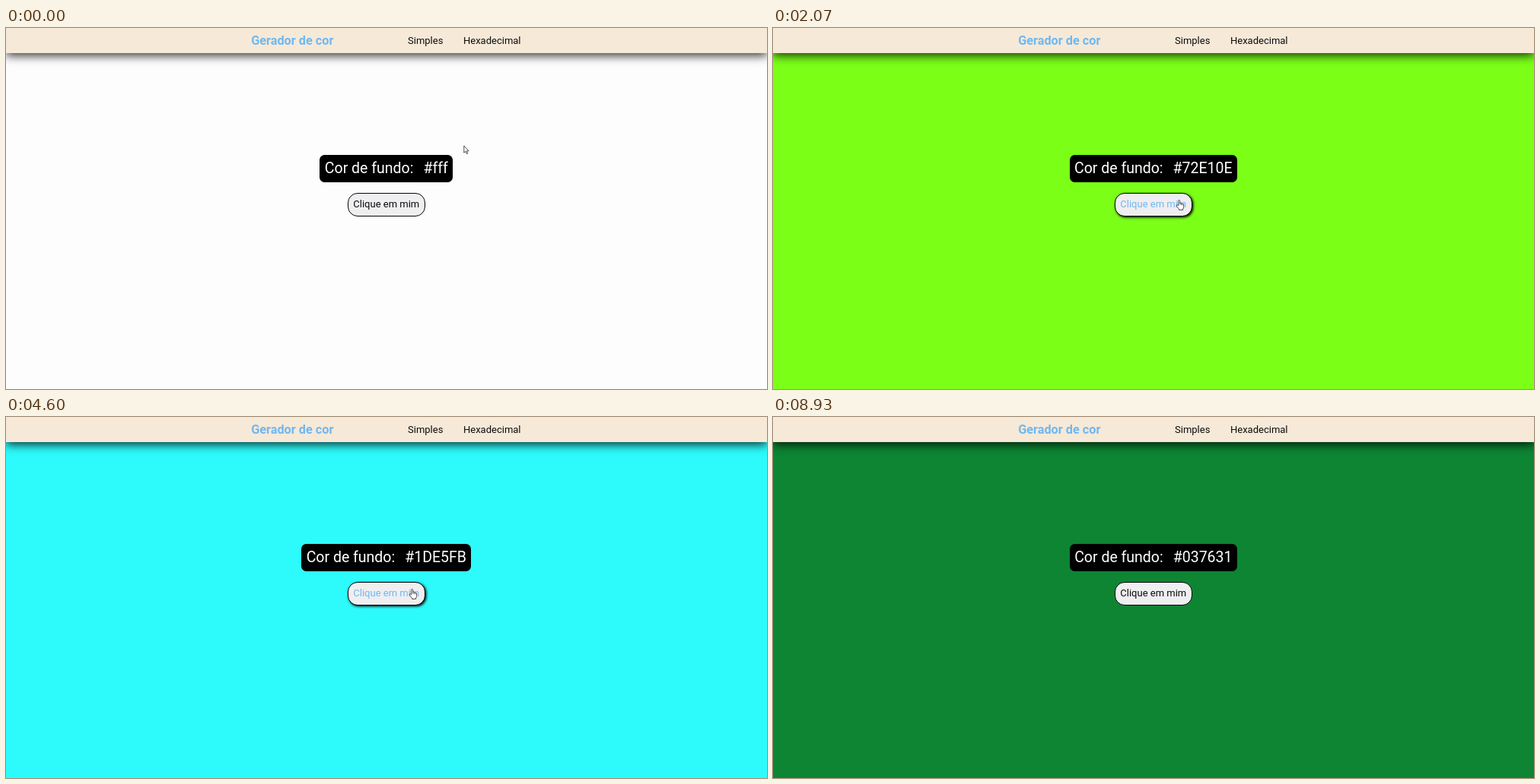
Write an HTML page that moves like this. It is 1000 px wide and 475 px high and loops after 9000 ms.

```html
<!DOCTYPE html>
<html lang="pt-BR">
<head>
<meta charset="utf-8">
<title>Gerador de cor</title>
<style>
  html, body { margin: 0; width: 100%; height: 100%; overflow: hidden; }
  #stage {
    position: relative; width: 1000px; height: 475px; overflow: hidden;
    font: 13px/1 Roboto, Arial, sans-serif; color: #0c0c0c; white-space: nowrap;
  }
  .bar {
    position: absolute; left: 0; top: 0; width: 1000px; height: 32.7px;
    background: #f6e9d8; box-shadow: 0 3.25px 13px rgba(0, 0, 0, .82);
  }
  .bar span { position: absolute; top: 0; line-height: 33px; }
  .bar .brand { left: 322.2px; font-size: 16.25px; font-weight: 700; color: #70b8f0; }
  .row { position: absolute; left: 0; width: 999.6px; display: flex; justify-content: center; }
  .label {
    display: flex; gap: 13px; box-sizing: border-box; height: 36.4px; padding: 0 6.5px;
    border-radius: 6.5px; background: #000; color: #fff; font-size: 19.5px; line-height: 36.4px;
  }
  .button {
    box-sizing: border-box; height: 31px; padding: 0 6.5px; line-height: 28.4px;
    border: 1.3px solid #050505; border-radius: 13px; background: #efeef1;
  }
  .button.hover { color: #70b8f0; box-shadow: 1.3px 1.3px 3.25px #000; }
  svg { position: absolute; left: 0; top: 0; }
</style>
</head>
<body>
<div id="stage">
  <div class="bar">
    <span class="brand">Gerador de cor</span>
    <span style="left:528px">Simples</span>
    <span style="left:601px">Hexadecimal</span>
  </div>
  <div class="row" style="top:166.8px">
    <div class="label"><span>Cor de fundo:</span><span id="value">#fff</span></div>
  </div>
  <div class="row" style="top:216.7px"><div class="button" id="button">Clique em mim</div></div>
  <svg width="1000" height="475" fill="#fff" stroke="#222" stroke-width=".8" stroke-linejoin="round">
    <path id="arrow" d="M0 0V9.2L2.1 7.3L3.6 10.6L5 10L3.6 6.8H6.3Z"/>
    <g id="hand">
      <path d="M2.6 7.5V1.2Q2.6 0 3.6 0T4.6 1.2V4.3Q5.6 3.6 6.4 4.6Q7.5 4 8.1 5Q9.6 4.6 9.6 6.2V9Q9.6 10.7 8.6 11.7V13H3.5V11.8L.2 7.8Q-.3 6.6 .8 6.4Q1.8 6.5 2.6 7.5Z"/>
      <path d="M4.6 4.3V6.5M6.4 4.6V6.7M8.1 5V7" fill="none" stroke-width=".6"/>
    </g>
  </svg>
</div>
<script>
  const LOOP = 9000;
  const get = id => document.getElementById(id);
  const stage = get('stage'), value = get('value'), button = get('button');
  const arrow = get('arrow'), hand = get('hand');

  // Each click: time, printed code, page colour.
  const clicks = [
    [0, '#fff', '#fefdfe'],
    [1080, '#EA55A0', '#df3e9d'],
    [2000, '#72E10E', '#7bff17'],
    [2940, '#B834D0', '#ab18c8'],
    [3880, '#1DE5FB', '#2dfafb'],
    [4820, '#037631', '#0d8533']
  ];

  // Pointer stops: time, x, y.
  const stops = [
    [0, 601.8, 155], [180, 601.8, 155], [750, 533.6, 226.4],
    [6600, 533.6, 226.4], [6860, 547, 215.2], [LOOP, 547, 215.2]
  ];
  const POINTER_GONE = 7000;

  const ease = p => p * p * (3 - 2 * p);

  function pointerAt(t) {
    const i = stops.findIndex(s => s[0] > t);
    const [t0, x0, y0] = stops[i - 1], [t1, x1, y1] = stops[i];
    const p = ease((t - t0) / (t1 - t0));
    return [x0 + (x1 - x0) * p, y0 + (y1 - y0) * p];
  }

  function place(cursor, x, y, visible) {
    cursor.setAttribute('transform', `translate(${x} ${y})`);
    cursor.setAttribute('visibility', visible ? 'visible' : 'hidden');
  }

  function draw(t) {
    const [, code, color] = clicks.filter(c => c[0] <= t).pop();
    const [x, y] = pointerAt(t);
    const over = x > 449 && x < 551 && y > 217 && y < 248;
    const shown = t < POINTER_GONE;
    stage.style.background = color;
    value.textContent = code;
    button.classList.toggle('hover', over);
    place(arrow, x, y, shown && !over);
    place(hand, x - 3.6, y, shown && over);
  }

  const start = performance.now();
  function tick() {
    draw((performance.now() - start) % LOOP);
    requestAnimationFrame(tick);
  }
  tick();
</script>
</body>
</html>
```
